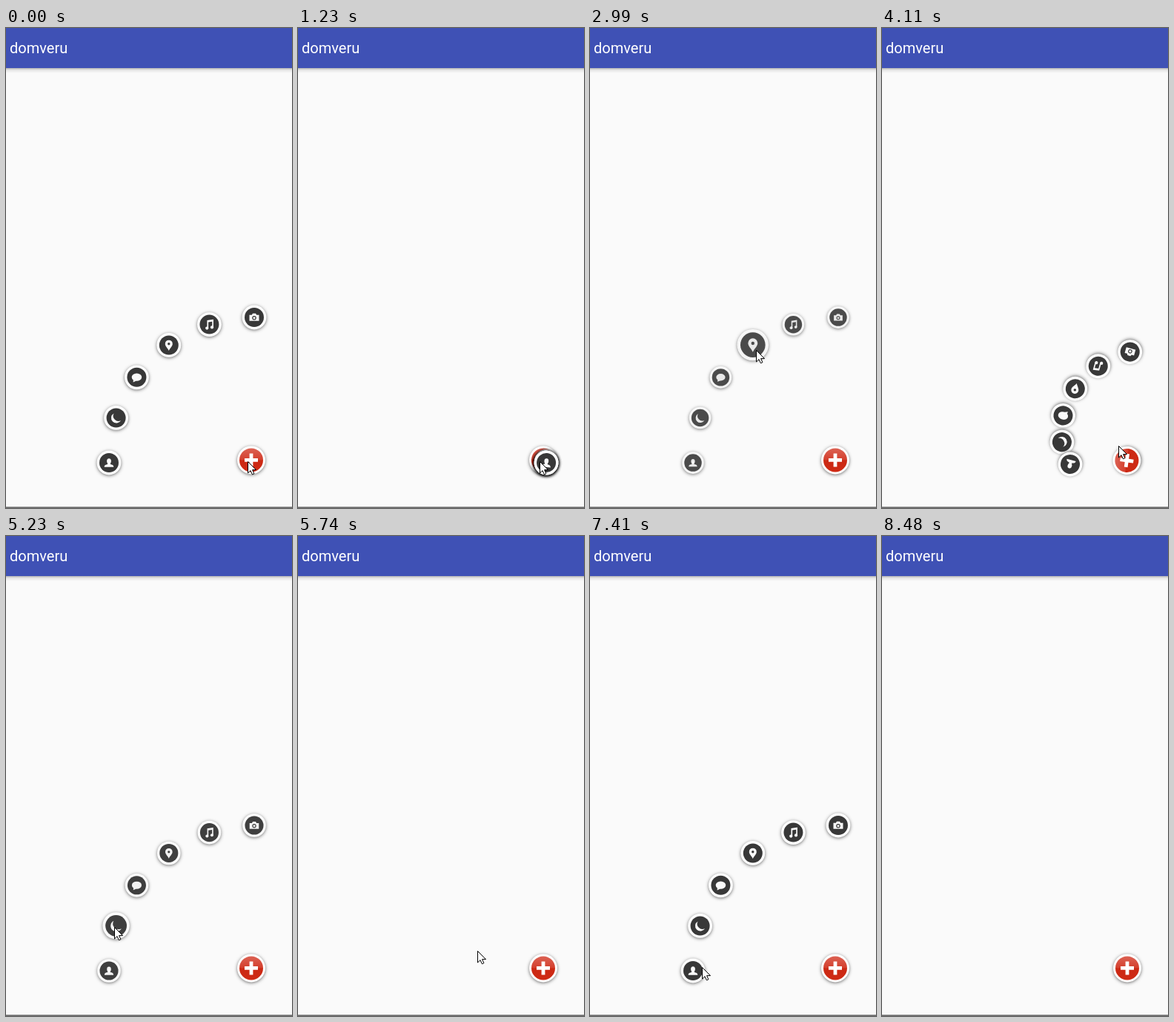
An HTML page with a canvas for the animation above (8730 ms loop, 386 by 647 pixels).

```html
<!DOCTYPE html>
<html lang="en">
<head>
<meta charset="utf-8">
<title>Arc menu</title>
<style>
  html, body { margin: 0; width: 100%; height: 100%; overflow: hidden; background: #fafafa; }
  canvas { display: block; }
</style>
</head>
<body>
<canvas id="stage" width="386" height="647"></canvas>
<script>
const ctx = document.getElementById('stage').getContext('2d');
const LOOP = 8730;
const HUB = { x: 331, y: 583 };
const ORIGIN = { x: 335, y: 587 };
const RADIUS = 196;
const MOVE = 193, STAGGER = 12.7, PICK = 195;
const DARK = '#383838', LIGHT = '#fafafa';

// Each showing of the menu ends by closing or by a tap on the item "pick".
const SHOWINGS = [
  { open: -1000, close: 270 },
  { open: 1230, pick: 2, pickAt: 2972 },
  { open: 3990, pick: 4, pickAt: 5224 },
  { open: 6420, pick: 5, pickAt: 7800 }
];

// Pointer moves between its resting points; "bend" bows the path upwards.
const POINTER_START = { x: 326, y: 584 };
const POINTER_MOVES = [
  { from: 1720, to: 2470, x: 224, y: 434, bend: 45 },
  { from: 3110, to: 3620, x: 336, y: 590, bend: 0 },
  { from: 3960, to: 4770, x: 146, y: 527, bend: 65 },
  { from: 5470, to: 5990, x: 326, y: 587, bend: 0 },
  { from: 6350, to: 7070, x: 151, y: 581, bend: 26 },
  { from: 7950, to: 8330, x: 329, y: 617, bend: 0 }
];
const POINTER_GONE = 8480;
const ARROW = new Path2D('M.5 .5V16L4 12.6L6.4 17.8L8.9 16.7L6.6 11.6H11.5Z');

const clamp = v => Math.min(1, Math.max(0, v));
const easeOut = v => 1 - Math.pow(1 - clamp(v), 1.5);
const smooth = v => { const u = clamp(v); return u * u * (3 - 2 * u); };

function disc(x, y, r, color) {
  ctx.fillStyle = color;
  ctx.beginPath();
  ctx.arc(x, y, r, 0, Math.PI * 2);
  ctx.fill();
}

// White disc whose shadow turns with it.
function raisedDisc(r, angle) {
  ctx.save();
  ctx.shadowColor = 'rgba(0,0,0,.55)';
  ctx.shadowBlur = 4;
  ctx.shadowOffsetX = -Math.sin(angle);
  ctx.shadowOffsetY = Math.cos(angle);
  disc(0, 0, r, '#fff');
  ctx.restore();
}

function fillPath(d, color = LIGHT) {
  ctx.fillStyle = color;
  ctx.fill(new Path2D(d));
}

const ICONS = [
  function camera() {
    fillPath('M-6.5-3.2H-3.2L-2-5.2H2L3.2-3.2H6.5V4.8H-6.5Z');
    disc(0, .8, 2.8, DARK);
    disc(0, .8, 1.6, LIGHT);
  },
  function music() {
    fillPath('M-3-5.5L5.5-6.8V4H3.8V-3.8L-1.3-3V5.2H-3Z');
    disc(-3.2, 5, 2.1, LIGHT);
    disc(3.6, 3.8, 2.1, LIGHT);
  },
  function pin() {
    fillPath('M0 7.5C-1.5 4-5 1.5-5-1.8A5 5 0 0 1 5-1.8C5 1.5 1.5 4 0 7.5Z');
    disc(0, -1.7, 1.7, DARK);
  },
  function chat() {
    fillPath('M-6.8-.2A6.8 5.2 0 0 1 6.8-.2A6.8 5.2 0 0 1-1 5L-4.8 6.6L-4.6 3.7Q-6.8 2.2-6.8-.2Z');
  },
  function moon() {
    fillPath('M-3-6A7 7 0 1 0 6.5 3.5A7 7 0 0 1-3-6Z');
  },
  function person() {
    fillPath('M-1.9-2H1.9V2C4 2.5 6.3 2.8 6.3 5.8H-6.3C-6.3 2.8-4 2.5-1.9 2Z');
    ctx.beginPath();
    ctx.ellipse(0, -2.2, 2.9, 3.5, 0, 0, Math.PI * 2);
    ctx.fill();
  }
];

function drawBackdrop() {
  ctx.fillStyle = LIGHT;
  ctx.fillRect(0, 0, 386, 647);
  const shade = ctx.createLinearGradient(0, 54, 0, 61);
  shade.addColorStop(0, 'rgba(0,0,0,.28)');
  shade.addColorStop(.4, 'rgba(0,0,0,.08)');
  shade.addColorStop(1, 'rgba(0,0,0,0)');
  ctx.fillStyle = shade;
  ctx.fillRect(0, 54, 386, 7);
  ctx.fillStyle = '#3f51b5';
  ctx.fillRect(0, 0, 386, 54);
  ctx.fillStyle = '#fff';
  ctx.font = '20px Roboto, sans-serif';
  ctx.fillText('domveru', 5, 34);
  ctx.fillStyle = '#a0a0a0';
  ctx.fillRect(0, 645, 386, 1);
  ctx.fillStyle = '#6b6b6b';
  ctx.fillRect(0, 646, 386, 1);
}

function drawHub(angle) {
  ctx.save();
  ctx.translate(HUB.x, HUB.y);
  ctx.rotate(angle);
  ctx.translate(0, -.6);
  raisedDisc(19, angle);
  const red = ctx.createLinearGradient(0, -16, 0, 16);
  red.addColorStop(0, '#dc6254');
  red.addColorStop(.48, '#d4402e');
  red.addColorStop(.52, '#cb2914');
  red.addColorStop(1, '#cf2a15');
  disc(0, 0, 16, red);
  fillPath('M-9-2.4H-2.4V-9H2.4V-2.4H9V2.4H2.4V9H-2.4V2.4H-9Z', '#fff');
  ctx.restore();
}

// Share of the full radius reached by an item.
function reach(showing, t, index) {
  const since = start => easeOut((t - start - index * STAGGER) / MOVE);
  return since(showing.open) - (showing.close ? since(showing.close) : 0);
}

function isVisible(showing, t) {
  const end = showing.close
    ? showing.close + MOVE + STAGGER * (ICONS.length - 1)
    : showing.pickAt + PICK;
  return t >= showing.open - 10 && t < end;
}

function drawItem(showing, t, index, angle) {
  const arc = index * Math.PI / 10;
  const r = RADIUS * reach(showing, t, index);
  const fade = showing.pickAt ? clamp((t - showing.pickAt) / PICK) : 0;
  const scale = index === showing.pick ? 1 + 3 * fade : 1 - fade;
  ctx.save();
  ctx.globalAlpha = 1 - fade;
  ctx.translate(ORIGIN.x - r * Math.sin(arc), ORIGIN.y - r * Math.cos(arc));
  ctx.scale(scale, scale);
  ctx.rotate(angle);
  ctx.translate(0, -1);
  raisedDisc(16.4, angle);
  disc(0, 0, 13, DARK);
  ICONS[index]();
  ctx.restore();
}

function drawPointer(t) {
  if (t >= POINTER_GONE) return;
  let { x, y } = POINTER_START;
  for (const move of POINTER_MOVES) {
    const k = smooth((t - move.from) / (move.to - move.from));
    x += (move.x - x) * k;
    y += (move.y - y) * k - 4 * move.bend * k * (1 - k);
  }
  ctx.save();
  ctx.translate(Math.round(x), Math.round(y));
  ctx.fillStyle = '#fff';
  ctx.strokeStyle = '#000';
  ctx.lineWidth = 1;
  ctx.fill(ARROW);
  ctx.stroke(ARROW);
  ctx.restore();
}

function draw(t) {
  const showing = SHOWINGS.find(s => isVisible(s, t));
  const turns = showing ? reach(showing, t, 0) : 0;
  drawBackdrop();
  drawHub(turns * Math.PI * 2);
  if (showing) ICONS.forEach((_, i) => drawItem(showing, t, i, turns * Math.PI * 4));
  drawPointer(t);
}

const startTime = performance.now();
function tick() {
  draw((performance.now() - startTime) % LOOP);
  requestAnimationFrame(tick);
}
tick();
</script>
</body>
</html>
```
